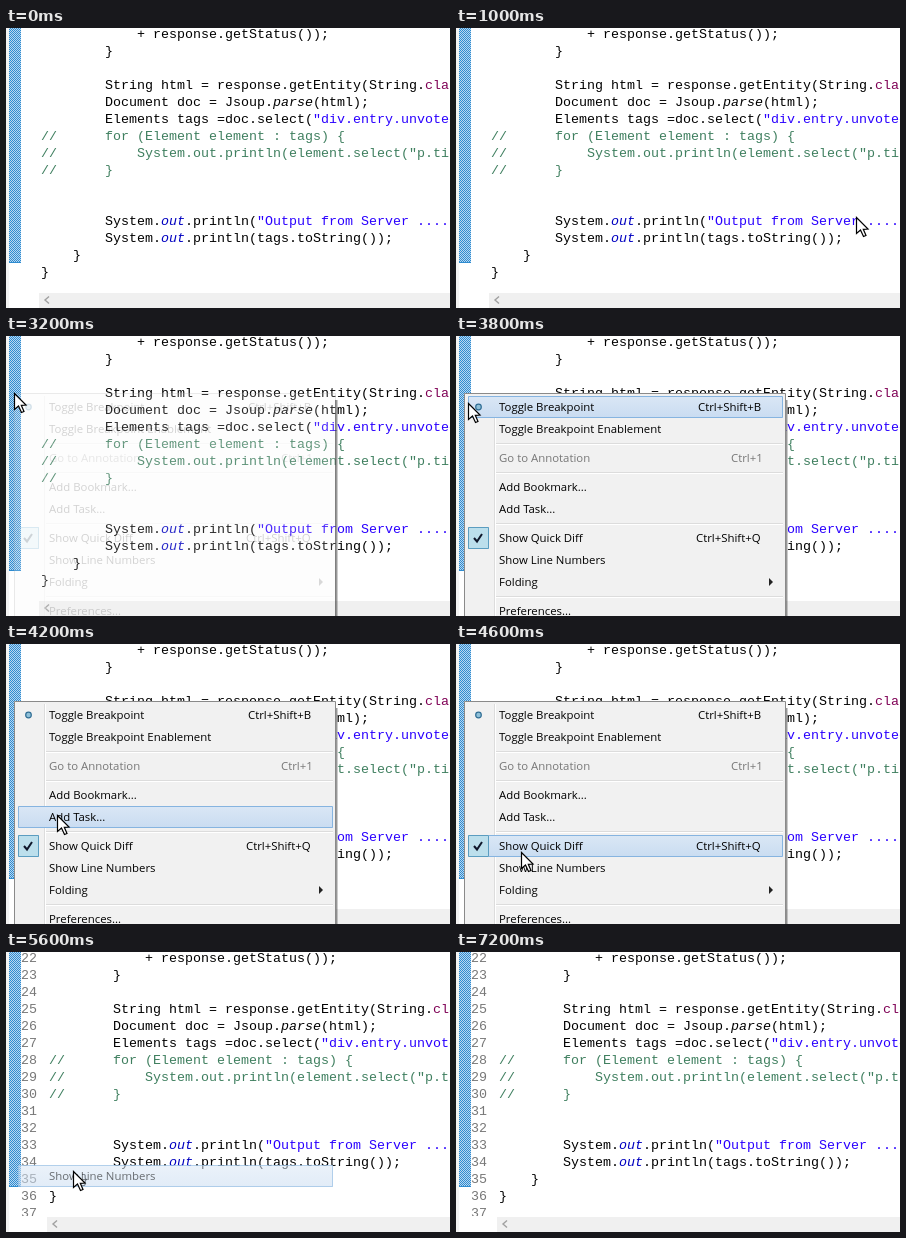
Animation of 444 by 280 pixels, one loop 7400 ms. Source, as an HTML page with a canvas:

```html
<!DOCTYPE html>
<html lang="en">
<head>
<meta charset="utf-8">
<title>Show line numbers</title>
<style>
html, body { margin: 0; width: 444px; height: 280px; overflow: hidden; background: #fff; }
canvas { display: block; }
</style>
</head>
<body>
<canvas id="stage" width="444" height="280"></canvas>
<script>
const ctx = document.getElementById('stage').getContext('2d');
const LOOP = 7400, STEP = 200;
const CODE_FONT = '13.333px "Liberation Mono", monospace';
const MENU_FONT = '11.4px "Open Sans", sans-serif';

// Markup: «k keyword», «s string», «c comment», «f field», «i static call»
const code = [
  '            + response.getStatus());',
  '        }',
  '',
  '        String html = response.getEntity(String.«kclass»);',
  '        Document doc = Jsoup.«iparse»(html);',
  '        Elements tags =doc.select(«s"div.entry.unvoted"»);',
  '«c//      for (Element element : tags) {»',
  '«c//          System.out.println(element.select("p.title"));»',
  '«c//      }»',
  '',
  '',
  '        System.«fout».println(«s"Output from Server .... \\n"»);',
  '        System.«fout».println(tags.toString());',
  '    }',
  '}'
];
const plain = ['', '#000'];
const styles = {
  k: ['', '#7f0055'], s: ['', '#2a00ff'], c: ['', '#3f7f5f'],
  f: ['italic ', '#0000c0'], i: ['italic ', '#000']
};

const menu = [
  { y: 71, text: 'Toggle Breakpoint', key: 'Ctrl+Shift+B', keyX: 242, icon: 'dot' },
  { y: 93, text: 'Toggle Breakpoint Enablement' },
  { y: 122, text: 'Go to Annotation', key: 'Ctrl+1', keyX: 275, off: true },
  { y: 151, text: 'Add Bookmark...' },
  { y: 173, text: 'Add Task...' },
  { y: 202, text: 'Show Quick Diff', key: 'Ctrl+Shift+Q', keyX: 240, icon: 'check' },
  { y: 224, text: 'Show Line Numbers' },
  { y: 246, text: 'Folding', icon: 'arrow' },
  { y: 275, text: 'Preferences...' }
];
const separators = [107, 136, 187, 260];

// Pointer path: time, x, y
const path = [
  [800, 446, 200], [1800, 9, 90], [2400, 9, 90], [2800, 9, 57], [3400, 9, 57],
  [3600, 13, 67], [3800, 13, 67], [4400, 66, 208], [4800, 66, 208],
  [5000, 68, 219], [6200, 68, 219], [7000, 300, 284]
];

function rect(x, y, w, h, color) {
  ctx.fillStyle = color;
  ctx.fillRect(x, y, w, h);
}

function label(str, x, y, color, font) {
  ctx.font = font;
  ctx.fillStyle = color;
  ctx.fillText(str, x, y);
}

function shape(points, x, y) {
  ctx.beginPath();
  points.forEach(([px, py]) => ctx.lineTo(x + px, y + py));
}

function stroke(color, width) {
  ctx.strokeStyle = color;
  ctx.lineWidth = width;
  ctx.stroke();
}

function frame(x, y, w, h, color) {
  ctx.beginPath();
  ctx.rect(x + 0.5, y + 0.5, w - 1, h - 1);
  stroke(color, 1);
}

const tile = document.createElement('canvas');
tile.width = tile.height = 2;
const tileCtx = tile.getContext('2d');
tileCtx.fillStyle = '#b8d6f0';
tileCtx.fillRect(0, 0, 2, 2);
tileCtx.fillStyle = '#2f8cd0';
tileCtx.fillRect(0, 0, 1, 1);
tileCtx.fillRect(1, 1, 1, 1);
const hatch = ctx.createPattern(tile, 'repeat');

function drawEditor(numbered) {
  const left = numbered ? 43 : 35;
  rect(0, 0, 444, 280, '#fff');
  rect(3, 0, 12, 235, hatch);
  rect(3, 234, 12, 1, '#2f8cd0');
  code.forEach((line, row) => {
    let x = left;
    line.split(/[«»]/).forEach((part, i) => {
      const [slant, color] = i % 2 ? styles[part[0]] : plain;
      const str = i % 2 ? part.slice(1) : part;
      label(str, x, 10 + row * 17, color, slant + CODE_FONT);
      x += str.length * 8;
    });
  });
  if (numbered) {
    for (let row = 0; row < 16; row++) label(22 + row, 15, 10 + row * 17, '#787878', CODE_FONT);
  }
  rect(0, 264, 444, 16, '#fff');
  rect(0, 0, 3, 280, '#f4f4f4');
  rect(left - 2, 265, 446, 15, '#f0f0f0');
  shape([[4, -3.5], [0, 0], [4, 3.5]], left + 4, 272);
  stroke('#a0a0a0', 1.4);
}

function drawHighlight(y) {
  const fill = ctx.createLinearGradient(0, y - 11, 0, y + 11);
  fill.addColorStop(0, '#dae7f5');
  fill.addColorStop(1, '#c9dcf1');
  rect(12, y - 11, 315, 22, fill);
  frame(12, y - 11, 315, 22, '#86b4e0');
}

function drawItem({ y, text, key, keyX, icon, off }) {
  const color = off ? '#777' : '#000';
  label(text, 43, y + 4, color, MENU_FONT);
  if (key) label(key, keyX, y + 4, color, MENU_FONT);
  if (icon === 'dot') {
    ctx.beginPath();
    ctx.arc(22.5, y, 2.8, 0, 7);
    ctx.fillStyle = '#8fc0d8';
    ctx.fill();
    stroke('#2f6d94', 1.2);
  } else if (icon === 'check') {
    rect(12, y - 11, 21, 22, '#bcdfec');
    frame(12, y - 11, 21, 22, '#5b9dc0');
    shape([[-4, 0], [-1, 3.5], [4, -4]], 22, y);
    stroke('#10182c', 2);
  } else if (icon === 'arrow') {
    shape([[0, -4], [4, 0], [0, 4]], 313, y);
    ctx.fillStyle = '#222';
    ctx.fill();
  }
}

function drawMenu(alpha, pointerY) {
  for (let i = 0; i < 3; i++) rect(329 + i, 64, 1, 216, `rgba(0,0,0,${0.6 - i * 0.2})`);
  ctx.globalAlpha = alpha;
  rect(8, 57, 322, 224, '#f1f1f1');
  frame(8, 57, 322, 230, '#8a8a8a');
  rect(38, 60, 1, 220, '#dcdcdc');
  rect(39, 60, 1, 220, '#fff');
  separators.forEach(y => {
    rect(40, y, 287, 1, '#dcdcdc');
    rect(40, y + 1, 287, 1, '#fff');
  });
  const active = alpha === 1 && menu.find(({ y }) => Math.abs(pointerY - y) <= 11);
  if (active) drawHighlight(active.y);
  menu.forEach(drawItem);
  ctx.globalAlpha = 1;
}

function pointerAt(t) {
  const next = path.findIndex(([time]) => time > t);
  if (next < 1) return null;
  const [t0, x0, y0] = path[next - 1], [t1, x1, y1] = path[next];
  const u = (t - t0) / (t1 - t0), ease = u * u * (3 - 2 * u);
  return [Math.round(x0 + (x1 - x0) * ease), Math.round(y0 + (y1 - y0) * ease)];
}

function drawPointer(x, y) {
  shape([[0, 0], [0, 16], [4, 12.5], [7, 19], [9.5, 18], [6.8, 11.8], [11.5, 11.5]], x - 0.5, y + 0.5);
  ctx.closePath();
  ctx.fillStyle = '#fff';
  ctx.fill();
  stroke('#000', 1.2);
}

function draw(t) {
  const pointer = pointerAt(t);
  drawEditor(t >= 5600);
  if (t >= 3200 && t < 5600) drawMenu(Math.min(1, (t - 3160) / 240), pointer[1]);
  if (t === 5600) {
    const item = menu[6];
    ctx.globalAlpha = 0.55;
    drawHighlight(item.y);
    drawItem(item);
    ctx.globalAlpha = 1;
  }
  if (pointer) drawPointer(...pointer);
}

function tick() {
  draw(Math.floor(performance.now() % LOOP / STEP) * STEP);
  requestAnimationFrame(tick);
}
tick();
</script>
</body>
</html>
```
